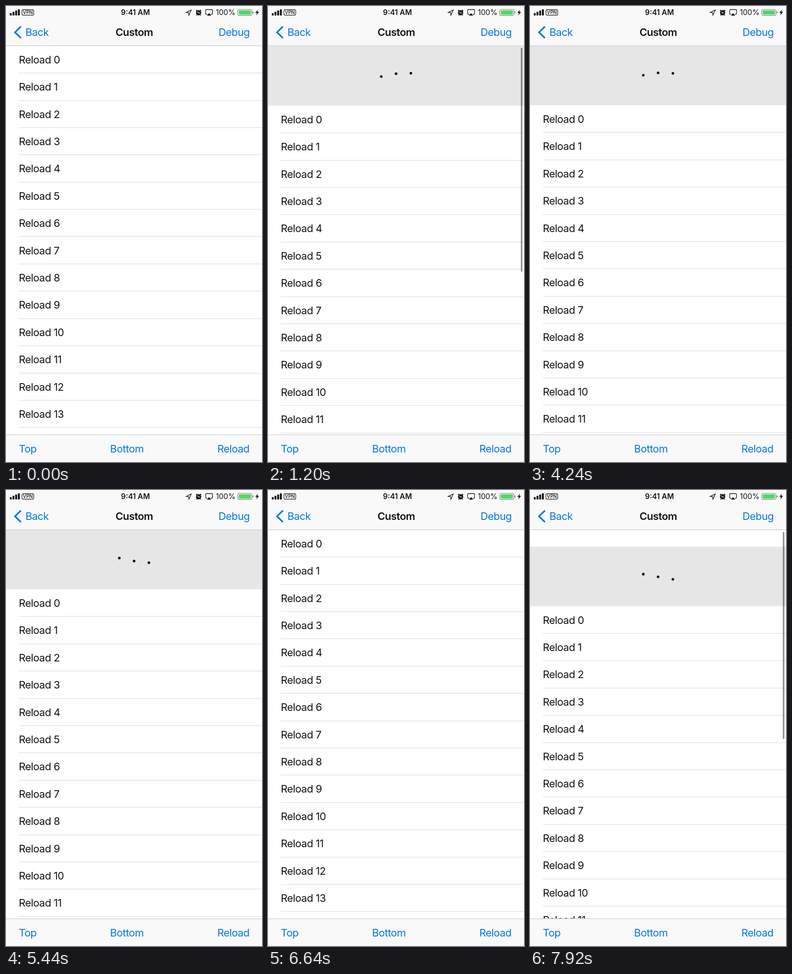
Write an HTML page with a canvas that moves like this. It is 540x960 px and loops after 8000 ms.

```html
<!DOCTYPE html>
<html lang="en">
<head>
<meta charset="utf-8">
<style>
html, body { margin: 0; width: 100%; height: 100%; overflow: hidden; background: #fff; }
canvas { display: block; }
</style>
</head>
<body>
<canvas width="540" height="960"></canvas>
<script>
const ctx = document.querySelector('canvas').getContext('2d');
const LOOP = 8000, STEP = 80;
const TOP = 83.7, ROW = 57.4, HEADER = 125.3, PEAK = 174;
const BLUE = '#0877e3', INK = '#141414';

const clamp = x => Math.max(0, Math.min(1, x));
const progress = (t, from, to) => clamp((t - from) / (to - from));
const smooth = x => x * x * (3 - 2 * x);

function drag(t, start, end, release) {
  if (t < release) return PEAK * smooth(progress(t, start, end));
  const u = (t - release) * 0.014;
  return HEADER + (PEAK - HEADER) * (1 + u) * Math.exp(-u);
}

function pull(t) {
  if (t < 5735) return drag(t, 40, 700, 760);
  if (t < 6620) return HEADER * (1 - smooth(progress(t, 5735, 6135)));
  return drag(t, 6620, 7780, 7848);
}

function rect(x, y, w, h, color) {
  ctx.fillStyle = color;
  ctx.fillRect(x, y, w, h);
}

function round(x, y, w, h, r, fill, stroke, width = 1.2) {
  ctx.beginPath();
  ctx.roundRect(x, y, w, h, r);
  if (fill) { ctx.fillStyle = fill; ctx.fill(); }
  if (stroke) { ctx.strokeStyle = stroke; ctx.lineWidth = width; ctx.stroke(); }
}

function dot(x, y, r, color = INK) {
  ctx.beginPath();
  ctx.arc(x, y, r, 0, 7);
  ctx.fillStyle = color;
  ctx.fill();
}

function line(d, color, width) {
  ctx.strokeStyle = color;
  ctx.lineWidth = width;
  ctx.stroke(new Path2D(d));
}

function text(s, x, y, { size = 22, weight = 400, color = INK, align = 'left', gap = -0.026 } = {}) {
  ctx.font = `${weight} ${size}px Inter, Roboto, sans-serif`;
  ctx.letterSpacing = gap * size + 'px';
  ctx.textAlign = align;
  ctx.fillStyle = color;
  ctx.fillText(s, x, y);
}

function refreshHeader(t, off) {
  const y = TOP + off - HEADER;
  const phase = 2.98 + (t - 1200) * 0.0125;
  const swing = t > 5440 && t < 6620 ? 0 : 6.3;
  ctx.globalAlpha = clamp(off / HEADER);
  rect(0, y, 540, HEADER, '#e6e6e6');
  for (let i = 0; i < 3; i++)
    dot(239 + i * 31.2, y + 63 + swing * Math.sin(phase + i * Math.PI / 3), 2.8);
  ctx.globalAlpha = 1;
}

function list(off) {
  for (let i = 0; i < 15; i++) {
    const y = TOP + off + i * ROW;
    text('Reload ' + i, 27, y + 37);
    rect(27, Math.round(y + ROW) - 0.5, 513, 1.2, '#dedede');
  }
}

function scrollBar(t, off) {
  const second = t >= 6620;
  const shown = second ? progress(t, 6660, 6760)
    : progress(t, 60, 160) * (1 - progress(t, 1440, 1700));
  if (!shown) return;
  const loading = t >= (second ? 7848 : 760);
  const length = loading ? 472 - (off - HEADER) : 513 - off;
  ctx.globalAlpha = shown;
  round(533.4, 88, 3.2, length, 1.6, 'rgba(0,0,0,.45)');
  ctx.globalAlpha = 1;
}

function statusBar() {
  for (let i = 0; i < 4; i++) round(8 + i * 5.7, 15 - i * 2.7, 4, 5 + i * 2.7, 1, INK);
  round(33.6, 7.6, 25, 11.8, 3, null, INK, 1.1);
  text('VPN', 46.1, 17.2, { size: 10, weight: 500, align: 'center', gap: 0 });
  text('9:41 AM', 273, 19.2, { size: 15.6, weight: 600, align: 'center', gap: 0 });

  line('M380 13.6L390.8 8.4L385.8 19.4L385.3 14.1Z', INK, 1.3);

  dot(406.3, 14.2, 5.5);
  line('M400.7 10.3L403.5 8.2M411.9 10.3L409.1 8.2M402.8 18.5L401.8 20M409.8 18.5L410.8 20', INK, 1.6);
  line('M403.6 12L406.3 14.6L409.2 14.6', '#f9f9f9', 1.1);

  line('M424.5 17.5H423Q421.2 17.5 421.2 15.7V9.3Q421.2 7.5 423 7.5H433.8Q435.6 7.5 435.6 9.3V15.7Q435.6 17.5 433.8 17.5H432.3', INK, 1.3);
  ctx.fillStyle = INK;
  ctx.fill(new Path2D('M428.4 15L433 20.2H423.8Z'));

  text('100%', 484, 19.2, { size: 15.6, align: 'right', gap: 0 });
  round(488.8, 7.3, 30, 12.6, 3.4, null, '#777', 1.1);
  round(490.9, 9.3, 25.8, 8.6, 1.8, '#4cd964');
  round(520.3, 11.4, 1.6, 4.4, 0.8, '#777');
  ctx.fillStyle = INK;
  ctx.fill(new Path2D('M531.6 7.6L525.8 14.6H529.4L527.8 20L533.8 12.6H530.1Z'));
}

function bars() {
  const blue = { color: BLUE }, right = { color: BLUE, align: 'right' };
  rect(0, 0, 540, 83, '#f9f9f9');
  rect(0, 83, 540, 1.3, '#cecece');
  statusBar();
  line('M31.5 43.3L19 55.4L31.5 67.5', BLUE, 3.4);
  text('Back', 41, 63.3, blue);
  text('Custom', 270.5, 63.3, { weight: 600, align: 'center' });
  text('Debug', 514, 63.3, right);

  rect(0, 903, 540, 57, '#f9f9f9');
  rect(0, 902, 540, 1.3, '#cecece');
  text('Top', 27, 939.8, blue);
  text('Bottom', 255, 939.8, { color: BLUE, align: 'center' });
  text('Reload', 513.5, 939.8, right);
}

function frame(now) {
  const t = Math.floor(now % LOOP / STEP) * STEP;
  const off = pull(t);
  rect(0, 0, 540, 960, '#fff');
  refreshHeader(t, off);
  list(off);
  scrollBar(t, off);
  bars();
  requestAnimationFrame(frame);
}
requestAnimationFrame(frame);
</script>
</body>
</html>
```
